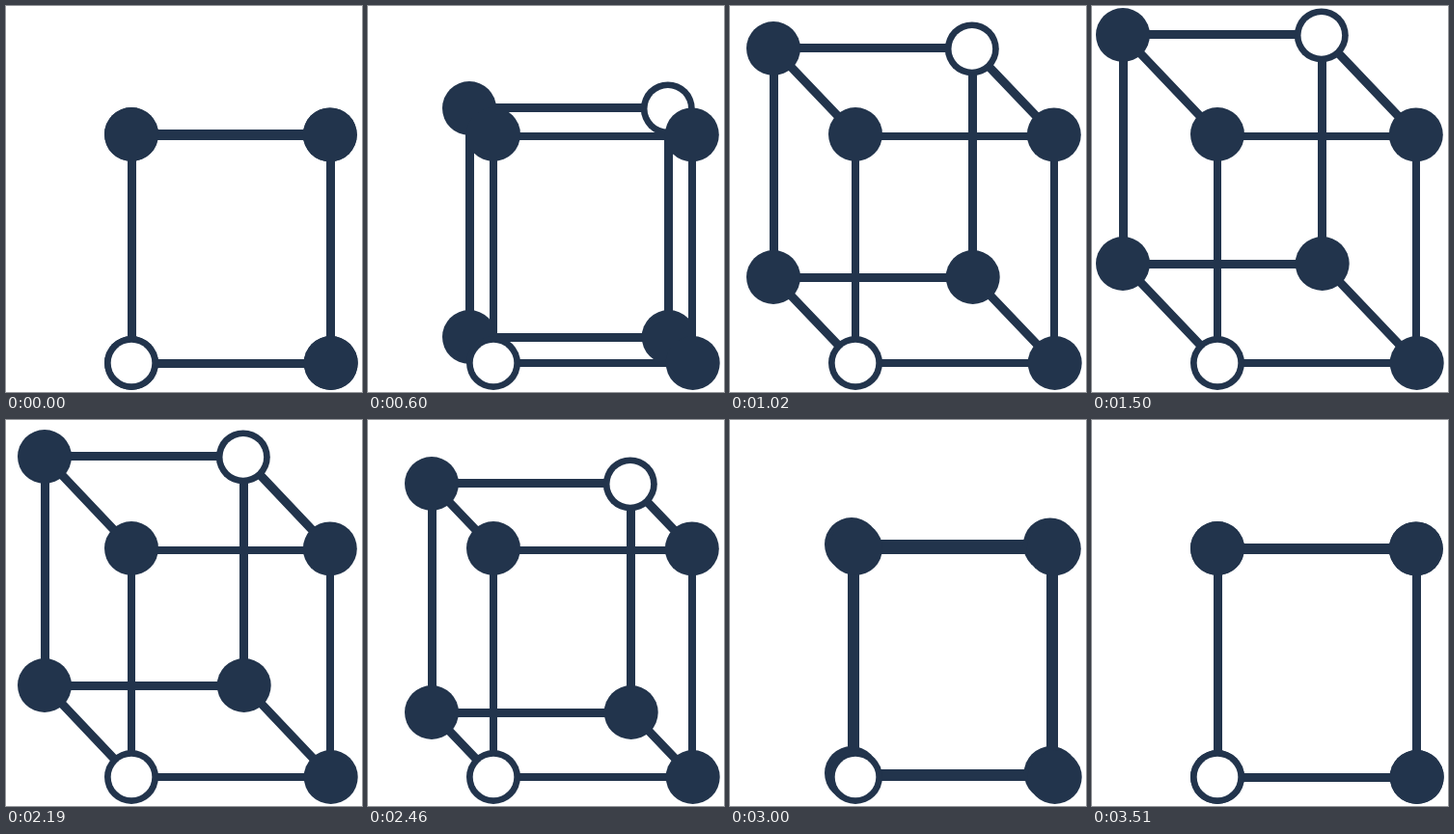
An HTML page with a canvas for the animation above (3.63 s loop, 369 by 400 pixels).

```html
<!DOCTYPE html>
<html lang="en">
<head>
<meta charset="utf-8">
<title>Cube</title>
<style>
  html, body { margin: 0; width: 100%; height: 100%; overflow: hidden; background: #fff; }
  canvas { display: block; }
</style>
</head>
<body>
<canvas id="stage" width="369" height="400"></canvas>
<script>
const ctx = document.getElementById('stage').getContext('2d');
const INK = '#22344c';
const LOOP = 3630, MOVE = 1500, RETURN = 1800;
const SHIFT = { x: -98, y: -103 };
const CORNERS = [[130, 133], [335.8, 133.4], [336.7, 370], [130, 370]];

// cubic-bezier(.635, 0, .365, 1), solved by bisection
function ease(x) {
  if (x <= 0) return 0;
  if (x >= 1) return 1;
  let low = 0, high = 1, s;
  for (let i = 0; i < 24; i++) {
    s = (low + high) / 2;
    const bx = 3 * s * (1 - s) * (0.635 * (1 - s) + 0.365 * s) + s ** 3;
    if (bx < x) low = s; else high = s;
  }
  return s * s * (3 - 2 * s);
}

function disc(x, y, radius, color) {
  ctx.fillStyle = color;
  ctx.beginPath();
  ctx.arc(x, y, radius, 0, 2 * Math.PI);
  ctx.fill();
}

function face(dx, dy, hollow, width, left, top, right, bottom) {
  ctx.lineWidth = width;
  ctx.strokeRect(left + dx, top + dy, right - left, bottom - top);
  CORNERS.forEach(([x, y], i) => {
    disc(x + dx, y + dy, 28, INK);
    if (i === hollow) disc(x + dx, y + dy, 21.3, '#fff');
  });
}

function draw(t) {
  const depth = t < RETURN ? ease(t / MOVE) : 1 - ease((t - RETURN) / MOVE);
  // whole pixels keep the bars crisp
  const dx = Math.round(SHIFT.x * depth), dy = Math.round(SHIFT.y * depth);
  ctx.clearRect(0, 0, 369, 400);
  ctx.strokeStyle = INK;
  ctx.lineWidth = 9;
  ctx.beginPath();
  for (const [x, y] of CORNERS) {
    ctx.moveTo(x, y);
    ctx.lineTo(x + dx, y + dy);
  }
  ctx.stroke();
  face(dx, dy, 1, 9, 130.5, 132.5, 336.5, 370.5);
  face(0, 0, 3, 8, 130, 135, 336, 370);
}

function tick() {
  draw(performance.now() % LOOP);
  requestAnimationFrame(tick);
}
tick();
</script>
</body>
</html>
```
